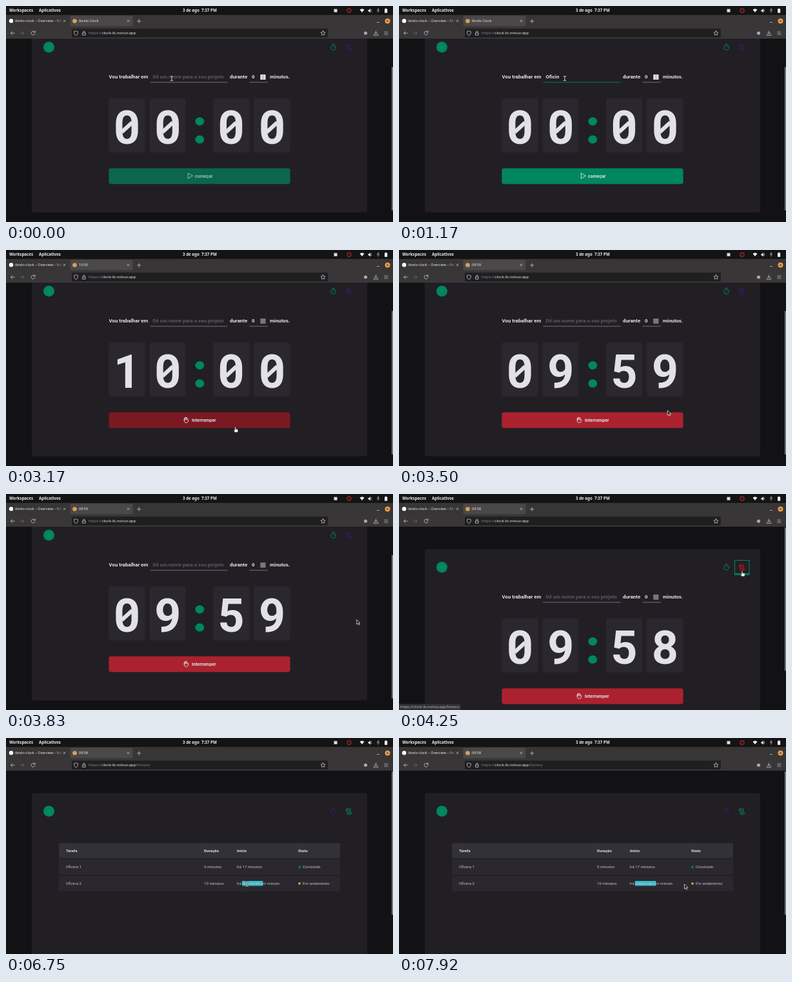
Recreate the animation shown at these times as an HTML page. Size 600x337 px, loop 8 s.

```html
<!DOCTYPE html>
<html lang="pt-BR">
<head>
<meta charset="utf-8">
<title>Timer</title>
<style>
  html, body { margin: 0; width: 100%; height: 100%; overflow: hidden; background: #121214; }
  svg { display: block; width: 100vw; height: 100vh; }
  text { white-space: pre; }
  .ui { font: 6px "Noto Sans", "Open Sans", sans-serif; fill: #ececee; }
  .top { font-weight: 600; font-size: 6.2px; }
  .tab { font-size: 5.5px; }
  .dim { fill: #85848a; }
  .page { font: 6.15px Roboto, sans-serif; fill: #c4c4cc; }
  .form { font-weight: 700; font-size: 7.9px; fill: #e1e1e6; }
  .button { font-weight: 700; font-size: 7.03px; fill: #e1e1e6; }
  .head { font-weight: 700; fill: #e1e1e6; }
  .digit { font: 700 71.5px Roboto, sans-serif; fill: #e1e1e6; text-anchor: middle; }
  .line { fill: none; stroke: #e6e6ea; stroke-width: .9; stroke-linecap: round; stroke-linejoin: round; }
  .ui .line { stroke: #cfcfd2; stroke-width: .75; }
</style>
</head>
<body>
<svg viewBox="0 0 600 337">
  <defs>
    <clipPath id="viewport"><rect y="51" width="600" height="286"/></clipPath>
    <linearGradient id="fade"><stop offset=".2" stop-color="#373536" stop-opacity="0"/><stop offset="1" stop-color="#373536"/></linearGradient>
  </defs>
  <rect width="600" height="337" fill="#121114"/>

  <g clip-path="url(#viewport)">
    <g id="doc">
      <rect x="40" y="86.1" width="520" height="286" rx="3.5" fill="#211f24"/>
      <circle cx="66.5" cy="114.2" r="8.5" fill="#00875f"/>
      <rect id="navFocus" x="520.5" y="103.5" width="22.5" height="22.5" fill="none" stroke="#00875f"/>
      <rect id="navHover" x="520.5" y="123.7" width="22.5" height="2" fill="#00875f"/>
      <g id="clockIcon" class="line"><circle cx="507.5" cy="114.8" r="3.8"/><path d="M506 109.5h3M507.5 114.8l1.7-1.7"/></g>
      <path id="scrollIcon" class="line" d="M529 113.5v-2a1.4 1.4 0 0 0-2.2 1.3h2M528 110.5h6v5.7M529 113.5v3.8M531 113h2M531 115h2M530.5 117h5.5c0 2-1 2-1.6 2h-4.4c-1 0-1.2-1-1.2-2"/>

      <g id="form">
        <g class="page">
          <text class="form" x="159.5" y="163.2">Vou trabalhar em</text>
          <text class="form" id="task" x="227.5" y="163.2"></text>
          <text class="form" x="347" y="163.2">durante</text>
          <text class="form" id="minutes" x="381" y="163.2"></text>
          <text class="form" x="409" y="163.2">minutos.</text>
        </g>
        <path id="taskLine" d="M223.5 169H343.5" stroke-width=".9"/>
        <path d="M377.5 169H406" stroke="#7c7c8a" stroke-width=".9"/>
        <rect id="spinner" x="394.3" y="156.9" width="8.2" height="8"/>
        <path id="spinArrows" class="line" style="stroke:#55555c" d="M397.2 160l1.2-1.2 1.2 1.2M397.2 162.2l1.2 1.2 1.2-1.2"/>
        <g id="cards"></g>
        <ellipse cx="300.3" cy="230" rx="6.9" ry="6.4" fill="#00875f"/>
        <ellipse cx="300.3" cy="258.2" rx="6.9" ry="6.4" fill="#00875f"/>
        <rect id="button" x="159.4" y="303.2" width="281.2" height="24.6" rx="3.5"/>
        <g id="start" class="page">
          <path class="line" d="M282.3 311.2v8l6.8-4z"/>
          <text class="button" x="293" y="317.5">começar</text>
        </g>
        <g id="stop" class="page">
          <path class="line" d="M276.2 315.2v-2.3c0-1 1.4-1 1.4 0v-1.2c0-1 1.6-1 1.6 0v.4c0-1 1.6-1 1.6 0v3c.6-1.4 2.2-1 2 .2-.2 2.6-1.4 4.2-3.4 4.2-2.2 0-3.2-1.7-3.2-4.3M277.6 313v2M279.2 312.5v2.5"/>
          <text class="button" x="288" y="317.5">Interromper</text>
        </g>
      </g>

      <g id="history" class="page">
        <path d="M82 187.5V167.5a3.5 3.5 0 0 1 3.5-3.5H514.5a3.5 3.5 0 0 1 3.5 3.5V187.5z" fill="#323137"/>
        <path d="M82 189.3h436v24.2h-436zM82 215.3h436v23.7h-436z" fill="#2a282e"/>
        <rect id="selection" height="7.6" fill="#38bccb"/>
        <g id="cells"></g>
        <circle cx="455" cy="201.5" r="1.8" fill="#00875f"/>
        <circle cx="455" cy="227.1" r="1.8" fill="#fba94c"/>
      </g>
    </g>
    <rect id="thumb" x="598" width="1.7" height="224" rx=".8" fill="#85858a"/>
    <g id="status">
      <path d="M0 327.5H94a2 2 0 0 1 2 2V337H0z" fill="#323032"/>
      <text class="ui" style="font-size:5.8px;fill:#bdbcc4" x="2" y="334.3">https://clock-ib.nolvur.app/history</text>
    </g>
  </g>

  <g class="ui">
    <rect width="600" height="14" fill="#151414"/>
    <text class="top" x="5" y="9.2">Workspaces</text>
    <text class="top" x="51" y="9.2">Aplicativos</text>
    <text class="top" x="274" y="9.2">3 de ago</text>
    <text class="top" x="303" y="9.2">7:37 PM</text>
    <rect x="508.5" y="4.7" width="5" height="5" fill="#dcdcde"/>
    <circle cx="532" cy="7.2" r="3.3" fill="#3a1214" stroke="#b8373b" stroke-width=".9"/>
    <path d="M548.5 5.8q3.5-3 7 0L552 10z"/>
    <path d="M561.5 6h1.5l2-2v6.5l-2-2h-1.5z"/>
    <path class="line" d="M566.3 5.5q1 1.6 0 3.4"/>
    <g opacity=".5"><rect x="575.8" y="3.8" width="2.4" height="4.4" rx="1.2"/><path class="line" d="M574.6 7q2.4 4.5 4.8 0M577 9.2v1.5"/></g>
    <path d="M587 4.5h1.3v-.8h1.6v.8h1.3v6.2h-4.2z"/>

    <rect y="14" width="600" height="19" fill="#373536"/>
    <circle cx="8" cy="23.3" r="3.2" fill="#fff"/>
    <text class="tab" x="14" y="25.4">ibrelo-clock – Overview – Nol</text>
    <rect x="74" y="16" width="14" height="15" fill="url(#fade)"/>
    <rect x="87.5" y="16" width="11" height="15" fill="#373536"/>
    <rect x="99.5" y="15.5" width="97" height="16" rx="2" fill="#4a4849"/>
    <circle cx="106.5" cy="23.5" r="3.3" fill="#d9a05c"/>
    <text class="tab" id="title" x="113" y="25.4"></text>
    <path class="line" d="M89.2 21.9l2.8 2.8m0-2.8l-2.8 2.8M188 21.9l2.8 2.8m0-2.8L188 24.7M203.5 23.7h5.4M206.2 21v5.4M575.3 25.5h3.4"/>
    <circle cx="591.5" cy="23.5" r="4" fill="#ee9c4b"/>
    <path class="line" style="stroke:#332211" d="M590.2 22.2l2.6 2.6m0-2.6l-2.6 2.6"/>

    <rect y="33" width="600" height="18" fill="#383637"/>
    <rect x="102" y="35.3" width="397" height="13.6" rx="2" fill="#201f20"/>
    <path class="line" d="M13.3 42.3H7.5m2.6-2.6l-2.6 2.6 2.6 2.6M44.6 40.5a3 3 0 1 0 .5 2.4M45 38.7v2.3h-2.4"/>
    <path class="line" opacity=".35" d="M22 42.3h5.8m-2.6-2.6l2.6 2.6-2.6 2.6"/>
    <path class="line" d="M108.5 39l3 1c0 3-.8 5-3 6-2.2-1-3-3-3-6zM118.9 42h4.2v3.4h-4.2zM119.6 42v-1.3a1.4 1.4 0 0 1 2.8 0V42"/>
    <path class="line" d="M491.5 38.7l1.1 2.3 2.5.3-1.9 1.7.5 2.5-2.2-1.2-2.2 1.2.5-2.5-1.9-1.7 2.5-.3z"/>
    <circle cx="557.5" cy="42.3" r="2.6" fill="#a9a8aa"/>
    <path class="line" d="M573.5 39v4.3m-2-1.8l2 2 2-2M570.5 43.8v2h6v-2"/>
    <path class="line" opacity=".75" d="M586.7 40.2h5.2M586.7 42.3h5.2M586.7 44.4h5.2"/>
    <text x="128" y="44.4"><tspan class="dim">https://</tspan>clock-ib.nolvur.app<tspan id="path" class="dim"></tspan></text>
  </g>

  <g id="cursor">
    <path id="arrow" d="M0 0v7.3l1.8-1.5 1.2 2.5 1.3-.6-1.2-2.4h2.2z" fill="#111" stroke="#fff" stroke-width=".7"/>
    <path id="hand" d="M-.8 0q.8-.8 1.5 0v2.8l3 .8q.8.3.6 1.3l-.6 3.1H-.5l-2.2-3q.2-1 1.9.2z" fill="#fff" stroke="#222" stroke-width=".5"/>
    <g id="beam" fill="none" stroke-linecap="round">
      <path d="M-1.7-3.5q1.7 0 1.7.8 0-.8 1.7-.8M0-2.7v5.4M-1.7 3.5q1.7 0 1.7-.8 0 .8 1.7.8" stroke="#222" stroke-width="1.8"/>
      <path d="M-1.7-3.5q1.7 0 1.7.8 0-.8 1.7-.8M0-2.7v5.4M-1.7 3.5q1.7 0 1.7-.8 0 .8 1.7.8" stroke="#fff" stroke-width=".8"/>
    </g>
  </g>
</svg>
<script>
const LOOP = 8000, MAX_SCROLL = 50;
const TASK = 'Oficina 2';
const START = 2760, PRESS = 4250, HISTORY = 4330;
const $ = id => document.getElementById(id);
const show = (id, on) => $(id).setAttribute('visibility', on ? 'inherit' : 'hidden');
const set = (id, attrs) => { for (const k in attrs) $(id).setAttribute(k, attrs[k]); };
const clamp = v => Math.min(1, Math.max(0, v));
const ease = v => v * v * (3 - 2 * v);
const between = (v, a, b) => v >= a && v <= b;

// Pointer hot spot: time, x, y
const POINTER = [
  [0, 257, 113], [1580, 257, 113], [1800, 398.5, 107.5], [2480, 398.5, 107.5],
  [2720, 350, 266], [2850, 350, 266], [3120, 355.5, 276.5], [3330, 355.5, 276.5],
  [3780, 543.7, 196], [3920, 543.7, 196], [4200, 532, 120.5], [5000, 532, 120.5],
  [5180, 117, 201], [5250, 117, 201], [5380, 98, 201], [5560, 471, 200],
  [5830, 471, 200], [5960, 478, 201], [6200, 398, 227], [6280, 398, 227],
  [6520, 366, 227], [6670, 366, 227], [7050, 430, 235], [7420, 446, 232], [7800, 442.5, 228]
];

const CARD_X = [159.4, 222.6, 321, 384.3];
$('cards').innerHTML = CARD_X.map((x, i) => `
  <rect x="${x}" y="194.3" width="56.2" height="84.3" rx="3.5" fill="#2a282e"/>
  <text class="digit" id="digit${i}" x="${x + 28.1}" y="264.7"></text>
  <path id="slash${i}" d="M${x + 20} 246.7l16.2-15" stroke="#e1e1e6" stroke-width="6.2"/>`).join('');

const COLUMNS = [93, 307, 358, 453];
const ROWS = [
  ['Tarefa', 'Duração', 'Início', 'Statu'],
  ['Oficina 1', '5 minutos', 'há 17 minutos', 'Concluido'],
  ['Oficina 2', '10 minutos', 'há menos de um minuto', 'Em andamento']
];
$('cells').innerHTML = ROWS.map((row, r) => row.map((cell, c) =>
  `<text class="${r ? '' : 'head'}" x="${COLUMNS[c] + (r && c === 3 ? 7 : 0)}" y="${177.7 + r * 25.7}">${cell}</text>`
).join('')).join('');

function pointerAt(t) {
  const next = POINTER.findIndex(p => p[0] > t);
  if (next < 0) return POINTER[POINTER.length - 1].slice(1);
  const [t0, x0, y0] = POINTER[next - 1], [t1, x1, y1] = POINTER[next];
  const k = ease((t - t0) / (t1 - t0));
  return [x0 + (x1 - x0) * k, y0 + (y1 - y0) * k];
}

// Five letters, a pause, then the remaining four
function typedLetters(t) {
  if (t < 500) return 0;
  if (t < 1170) return Math.min(5, 1 + Math.floor((t - 500) / 83));
  return Math.min(9, 6 + Math.floor((t - 1170) / 83));
}

function selectionAt(t, x) {
  if (between(t, 5250, 6240)) return [t < 5380 ? x : 98, 117.3, 197.4];
  if (t >= 6280) return [t < 6520 ? x : 366, 398.3, 223];
  return [0, 0, 0];
}

function draw(t) {
  const running = t >= START, history = t >= HISTORY;
  const scroll = MAX_SCROLL * (1 - ease(clamp((t - 3915) / 165)));
  const [x, y] = pointerAt(t), docY = y + scroll;

  const overButton = !history && between(x, 159.5, 440.5) && between(docY, 303, 328);
  const overNav = between(x, 520, 543) && between(docY, 103, 126);
  const overInput = !history && between(x, 223, 344) && between(docY, 153, 169);
  const overCell = history && (between(y, 195, 209) || between(y, 221, 235)) &&
    [[93, 118], [307, 340], [358, 424], [460, 502]].some(([a, b]) => between(x, a, b));

  set('doc', { transform: `translate(0 ${-scroll})` });
  set('thumb', { y: 52 + 43 * scroll / MAX_SCROLL });
  show('form', !history);
  show('history', history);

  const typed = running ? 0 : typedLetters(t);
  $('task').textContent = typed ? TASK.slice(0, typed) : 'Dê um nome para o seu projeto';
  $('task').style.fill = typed ? '#e1e1e6' : '#5b5960';
  set('taskLine', { stroke: t >= 80 && !running ? '#00875f' : '#7c7c8a' });
  $('minutes').textContent = running || t < 1920 ? '0' : t < 2120 ? '5' : '10';
  set('spinner', { fill: running ? '#77777c' : '#e6e6e9' });
  show('spinArrows', !running && !history);

  const clock = !running ? '00:00' : t < 3330 ? '10:00' : t < 4170 ? '09:59' : '09:58';
  [...clock.replace(':', '')].forEach((digit, i) => {
    $('digit' + i).textContent = digit;
    show('slash' + i, digit === '0' && !history);
  });
  $('title').textContent = running ? clock : 'Ibrelo Clock';

  set('button', {
    fill: running ? (overButton ? '#7a1921' : '#ab222e') : (overButton ? '#015f43' : '#00875f'),
    opacity: running || typed ? 1 : .7
  });
  set('start', { opacity: typed ? 1 : .7 });
  show('start', !running);
  show('stop', running && !history);

  const visited = '#3d1a69', current = '#00875f';
  $('clockIcon').style.stroke = history ? visited : current;
  $('scrollIcon').style.stroke = history ? current : t >= PRESS ? '#d8141c' : visited;
  show('navFocus', between(t, PRESS, 5230));
  show('navHover', overNav);
  show('status', overNav && t < 4900);
  $('path').textContent = history ? '/history' : '';

  const [left, right, top] = selectionAt(t, x);
  set('selection', { x: left, y: top, width: Math.max(0, right - left) });

  set('cursor', { transform: `translate(${x} ${y})` });
  const hand = overButton || overNav, beam = overInput || overCell;
  show('hand', hand);
  show('beam', beam);
  show('arrow', !hand && !beam);
}

const origin = performance.now();
function tick() {
  draw((performance.now() - origin) % LOOP);
  requestAnimationFrame(tick);
}
tick();
</script>
</body>
</html>
```
